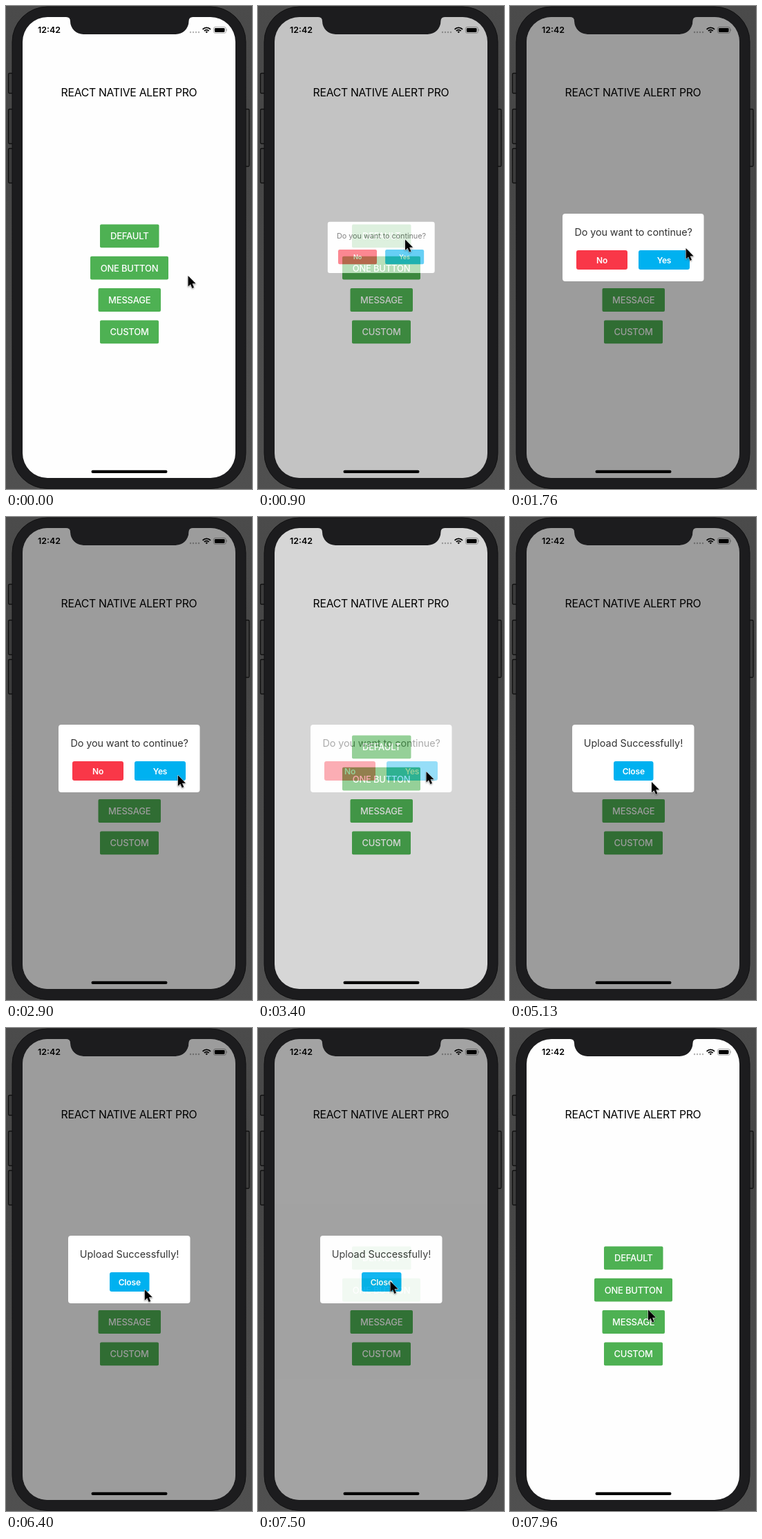
Write an HTML page that moves like this. It is 356x700 px and loops after 8000 ms.

```html
<!DOCTYPE html>
<html lang="en">
<head>
<meta charset="utf-8">
<title>Alert demo</title>
<style>
  html, body { margin: 0; width: 100%; height: 100%; overflow: hidden; background: #4a4a4a; }
  svg { display: block; width: 100vw; height: 100vh; }
  text { font-family: Inter, Roboto, sans-serif; text-anchor: middle; }
  .title { font-size: 15.8px; letter-spacing: -.3px; }
  .label { font-size: 13px; font-weight: 500; letter-spacing: -.2px; fill: #fff; }
  .message { font-size: 14.4px; fill: #333; }
  .action { font-size: 12px; font-weight: 600; letter-spacing: -.15px; fill: #fff; }
  .clock { font-size: 12.4px; font-weight: 600; }
  #cursor { filter: drop-shadow(0 1px 1px rgba(0, 0, 0, .4)); }
</style>
</head>
<body>
<svg viewBox="0 0 356 700">
  <defs>
    <linearGradient id="backdrop" x2="0" y2="1">
      <stop offset="0" stop-color="#4b4b4b"/>
      <stop offset=".3" stop-color="#454545"/>
      <stop offset="1" stop-color="#505050"/>
    </linearGradient>
    <clipPath id="screen"><path d="M24 52a36 36 0 0 1 36-36H87q6 0 6 6a19 19 0 0 0 19 19H245.500a19 19 0 0 0 19-19q0-6 6-6H296a36 36 0 0 1 36 36V648a36 36 0 0 1-36 36H60a36 36 0 0 1-36-36Z"/></clipPath>
  </defs>

  <rect width="356" height="700" fill="url(#backdrop)"/>
  <g fill="#3c3c3c" stroke="#101010" stroke-width="1.3">
    <rect x="3.600" y="97.500" width="8" height="29" rx="1.500"/>
    <rect x="3.600" y="149.500" width="8" height="50" rx="1.500"/>
    <rect x="3.600" y="206.500" width="8" height="50" rx="1.500"/>
    <rect x="344" y="149.500" width="8" height="83" rx="1.500"/>
  </g>
  <rect x="9" y="1" width="338" height="698.500" rx="51" fill="#1c1c1e" stroke="#111112"/>

  <g clip-path="url(#screen)">
    <rect x="24" y="16" width="308" height="668" fill="#fefefe"/>
    <text class="clock" x="62.500" y="39">12:42</text>
    <g fill="#b4b4b4">
      <circle cx="267" cy="38" r="1.200"/><circle cx="271" cy="38" r="1.200"/>
      <circle cx="275" cy="38" r="1.200"/><circle cx="279" cy="38" r="1.200"/>
    </g>
    <g fill="none" stroke="#000" stroke-width="1.800">
      <path d="M284.600 33.800a8 8 0 0 1 11.400 0M286.900 36.100a4.800 4.800 0 0 1 6.800 0"/>
      <path d="M290.300 39.300l-1.700-1.900a2.400 2.400 0 0 1 3.400 0Z" fill="#000" stroke="none"/>
    </g>
    <rect x="300.400" y="30.400" width="18" height="9" rx="2.600" fill="none" stroke="#999" stroke-width=".8"/>
    <rect x="301.900" y="31.900" width="14.600" height="6" rx="1.300"/>
    <path d="M319.400 33.300q1.600 1.600 0 3.200Z" fill="#888"/>
    <text class="title" x="178" y="130.600">REACT NATIVE ALERT PRO</text>
    <g id="menu"></g>
    <rect x="123.500" y="672.800" width="110" height="4.200" rx="2.100"/>
    <g id="modal">
      <rect x="24" y="16" width="308" height="668" fill="#000" fill-opacity=".39"/>
      <g id="alert">
        <g id="confirm"></g>
        <g id="notice"></g>
      </g>
    </g>
  </g>

  <path id="cursor" d="M0 0V15.600L3.500 12.300L5.900 18L8.500 16.900L6.100 11.300H11.100Z" stroke="#fff" stroke-width="1" stroke-linejoin="round" paint-order="stroke"/>
</svg>

<script>
  const LOOP = 8000;
  const CENTER = [178.3, 349.8];
  const $ = id => document.getElementById(id);

  function add(parent, tag, attrs, text) {
    const node = document.createElementNS('http://www.w3.org/2000/svg', tag);
    for (const key in attrs) node.setAttribute(key, attrs[key]);
    if (text) node.textContent = text;
    parent.appendChild(node);
    return node;
  }

  function button(parent, label, x, y, width, height, fill, style, baseline, rx) {
    const group = add(parent, 'g');
    add(group, 'rect', { x, y, width, height, rx, fill });
    add(group, 'text', { class: style, x: x + width / 2, y: y + baseline }, label);
    return group;
  }

  const menuButton = (label, x, row, width) =>
    button($('menu'), label, x, 316.5 + row * 46.3, width, 33.8, '#4eb153', 'label', 21.7, 2);
  const action = (parent, label, x, width, fill) =>
    button(parent, label, x, 354, width, 28, fill, 'action', 18.6, 3);

  function card(parent, x, width, message, spacing) {
    add(parent, 'rect', { x, y: 301, width, height: 98, rx: 4, fill: '#fff' });
    add(parent, 'text', { class: 'message', x: 178.6, y: 332.6, 'letter-spacing': spacing }, message);
  }

  const defaultButton = menuButton('DEFAULT', 136, 0, 85.5);
  const oneButton = menuButton('ONE BUTTON', 122, 1, 113);
  menuButton('MESSAGE', 133.5, 2, 90.5);
  menuButton('CUSTOM', 136, 3, 85);

  card($('confirm'), 76, 204.5, 'Do you want to continue?', -.1);
  action($('confirm'), 'No', 96, 74, '#f93748');
  const yesButton = action($('confirm'), 'Yes', 186, 74, '#00b1f0');

  card($('notice'), 90, 176.5, 'Upload Successfully!', 0);
  const closeButton = action($('notice'), 'Close', 150, 57.5, '#00b1f0');

  // Pointer tip: time, x, y. Repeated positions are rests.
  const PATH = [
    [0, 263.5, 391], [30, 263.5, 391], [300, 236, 362], [560, 213, 338.5], [1380, 213, 338.5],
    [1630, 238.5, 339], [1760, 254.5, 351], [1920, 257.5, 366], [2160, 255.5, 380],
    [2330, 255.5, 380], [2530, 253, 378.5], [2800, 253, 378.5], [3020, 243.5, 369],
    [3560, 243.5, 369], [4100, 205, 384], [6100, 205, 384], [6500, 199, 377],
    [6900, 193, 370], [7060, 191.5, 367], [7570, 191.5, 367], [7960, 200, 408.5], [8000, 200, 408.5]
  ];

  const clamp = v => Math.min(1, Math.max(0, v));
  const ease = v => (v = clamp(v), v < .5 ? 2 * v * v : 1 - 2 * (1 - v) ** 2);

  function slope(i, axis) {
    const a = PATH[i - 1], b = PATH[i], c = PATH[i + 1];
    if (!a || !c) return 0;
    const before = b[axis] - a[axis], after = c[axis] - b[axis];
    return before * after <= 0 ? 0 : (before + after) / (c[0] - a[0]);
  }

  function pointer(t) {
    let i = 0;
    while (i < PATH.length - 2 && t >= PATH[i + 1][0]) i++;
    const a = PATH[i], b = PATH[i + 1], span = b[0] - a[0];
    const u = (t - a[0]) / span, v = 1 - u;
    return [1, 2].map(k =>
      a[k] * (1 + 2 * u) * v * v + b[k] * (1 + 2 * v) * u * u +
      span * u * v * (slope(i, k) * v - slope(i + 1, k) * u));
  }

  // Touch feedback: dim to 20%, then recover.
  function press(t, down, up, back) {
    const dim = time => 1 - .8 * ease((time - down) / 150);
    if (t < up) return dim(t);
    return dim(up) + (1 - dim(up)) * ease((t - up) / back);
  }

  function spring(ms) {
    const s = Math.max(0, ms) / 1000, decay = 11, w = 10.45;
    return 1 - Math.exp(-decay * s) * (Math.cos(w * s) + decay / w * Math.sin(w * s));
  }

  const fade = (t, open, close) => ease((t - open) / 220) - ease((t - close) / 220);

  function draw(t) {
    const second = t > 4000;
    const opened = second ? 4420 : 780;
    const shown = fade(t, opened, second ? 7459 : 3280);
    const scale = spring(t - opened + 20);
    const [cx, cy] = CENTER;

    $('modal').setAttribute('opacity', shown);
    $('alert').setAttribute('transform',
      `translate(${cx} ${cy}) scale(${scale}) translate(${-cx} ${-cy})`);
    $('confirm').setAttribute('display', second ? 'none' : 'inline');
    $('notice').setAttribute('display', second ? 'inline' : 'none');

    defaultButton.setAttribute('opacity', press(t, 560, 800, 250));
    oneButton.setAttribute('opacity', press(t, 4180, 4420, 250));
    yesButton.setAttribute('opacity', press(t, 2980, 3290, 100));
    closeButton.setAttribute('opacity', press(t, 7350, 7410, 90));

    $('cursor').setAttribute('transform', `translate(${pointer(t).join(' ')})`);
  }

  const start = performance.now();
  function tick() {
    draw((performance.now() - start) % LOOP);
    requestAnimationFrame(tick);
  }
  tick();
</script>
</body>
</html>
```
